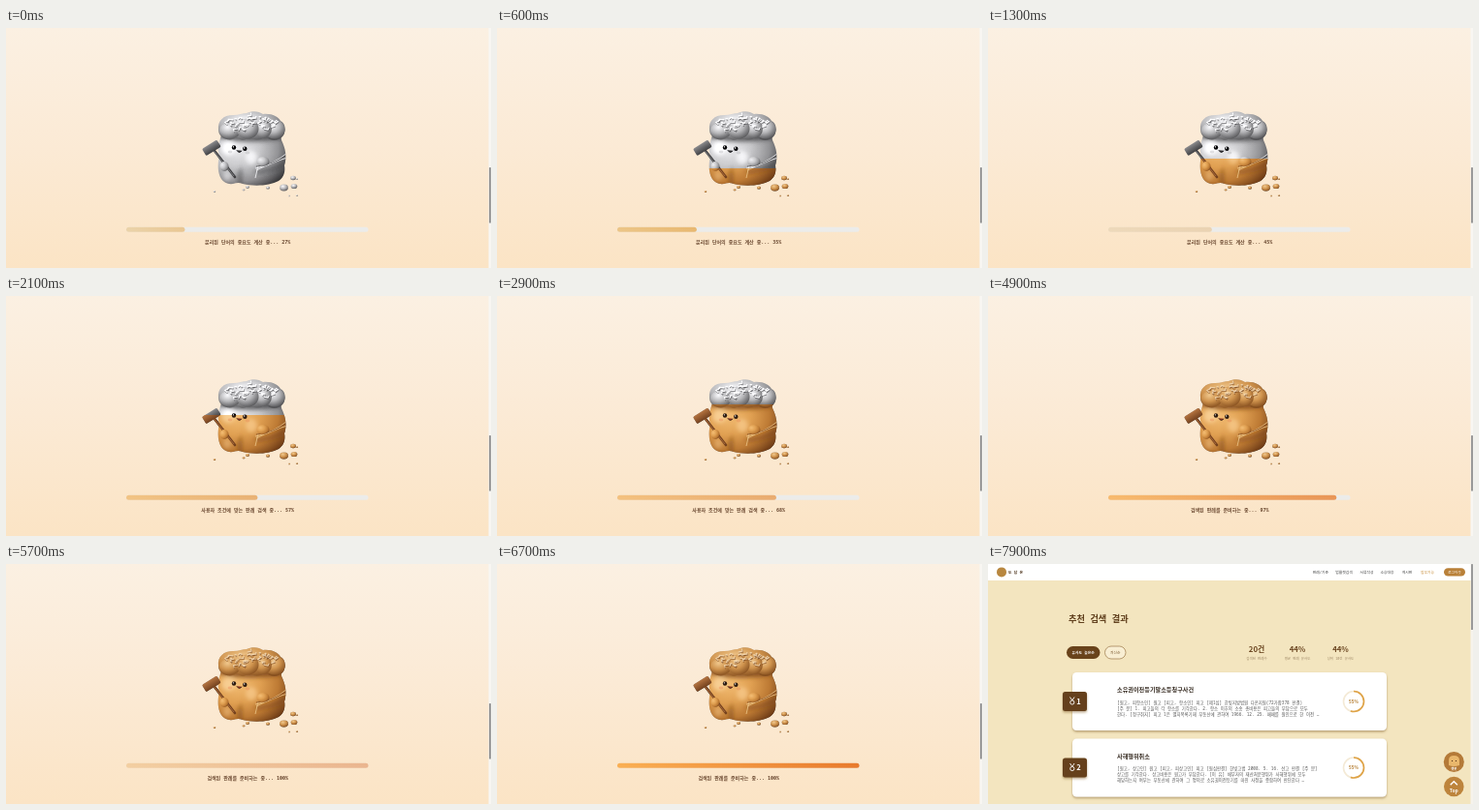
These frames come from a looping animation (500 by 248 pixels, 8000 ms). An HTML page:

```html
<!DOCTYPE html>
<html lang="ko">
<head>
<meta charset="utf-8">
<style>
html, body { margin: 0; width: 100%; height: 100%; overflow: hidden; background: #fbead4; }
svg { display: block; width: 100vw; height: 100vh; }
text { font-family: "Noto Sans Mono", "Noto Sans CJK KR", monospace; white-space: pre; }
.sans { font-family: "Noto Sans CJK KR", "Noto Sans", sans-serif; }
.mid { text-anchor: middle; }
.bold { font-weight: 700; }
</style>
</head>
<body>
<svg viewBox="0 0 500 248" preserveAspectRatio="none">
  <defs>
    <linearGradient id="sky" x2="0" y2="1">
      <stop stop-color="#fbf0e2"/><stop offset=".5" stop-color="#fbead5"/><stop offset="1" stop-color="#fbe4c5"/>
    </linearGradient>
    <linearGradient id="barFill">
      <stop id="barStart"/><stop id="barEnd" offset="1"/>
    </linearGradient>
    <radialGradient id="dough" cx=".28" cy=".32" r=".85">
      <stop stop-color="#f3bd74"/><stop offset=".4" stop-color="#e0a052"/>
      <stop offset=".72" stop-color="#bd7a34"/><stop offset="1" stop-color="#6f3c16"/>
    </radialGradient>
    <radialGradient id="crust" cx=".38" cy=".3" r=".75">
      <stop stop-color="#f0c78c"/><stop offset=".5" stop-color="#d0944e"/><stop offset="1" stop-color="#87501f"/>
    </radialGradient>
    <linearGradient id="wood" x2="0" y2="1">
      <stop stop-color="#b57440"/><stop offset="1" stop-color="#75421f"/>
    </linearGradient>
    <filter id="gray" color-interpolation-filters="sRGB" x="-.1" y="-.1" width="1.2" height="1.2">
      <feColorMatrix type="saturate" values="0"/>
      <feComponentTransfer>
        <feFuncR type="linear" slope="1.45" intercept="-.17"/>
        <feFuncG type="linear" slope="1.45" intercept="-.17"/>
        <feFuncB type="linear" slope="1.45" intercept="-.16"/>
      </feComponentTransfer>
    </filter>
    <filter id="soft" x="-.5" y="-.5" width="2" height="2"><feGaussianBlur stdDeviation="2"/></filter>
    <filter id="shadow" x="-.1" y="-.2" width="1.2" height="1.5">
      <feDropShadow dx="0" dy="1.5" stdDeviation="1.3" flood-color="#7a5520" flood-opacity=".5"/>
    </filter>
    <clipPath id="below"><rect id="belowRect" x="190" width="130" height="120"/></clipPath>
    <clipPath id="inBody"><use href="#body"/></clipPath>
    <g id="bread">
      <path id="body" d="M223 108C220 117 217 124 220 132C218 140 218 150 222 156Q226 162 234 161Q240 159 244 161C256 164 272 163 281 158C287 154 288 148 287 142C290 133 288 124 284 116L282 106Z" fill="url(#dough)"/>
      <g clip-path="url(#inBody)">
        <g filter="url(#soft)">
          <path d="M220 114Q250 121 288 114V108H220Z" fill="#7a4318" opacity=".75"/>
          <path d="M240 164Q236 152 243 143L244 164Z" fill="#7a4318" opacity=".55"/>
          <path d="M256 147Q270 146 290 136V143Q272 151 258 151Z" fill="#7a4318" opacity=".5"/>
          <ellipse cx="229" cy="124" rx="7" ry="7" fill="#ffdfae" opacity=".6"/>
          <ellipse cx="253" cy="134" rx="6" ry="7" fill="#ffd79e" opacity=".55"/>
          <ellipse cx="228" cy="153" rx="4" ry="5" fill="#ffd79e" opacity=".4"/>
        </g>
        <path d="M257 145Q276 141 290 129M258 147Q276 138 290 134M260 142L257 155" fill="none" stroke="#f0c98c" stroke-width=".8"/>
        <path d="M258 143Q276 141 288 132" fill="none" stroke="#7d451a" stroke-width=".7"/>
      </g>
      <path d="M219 105C218 96 224 90 234 90C240 90 244 88 248 88C254 85 261 86 265 89C274 88 281 92 283 96C288 98 289 106 286 111C281 118 272 117 268 112C262 117 255 116 250 113C246 118 240 115 238 113C232 118 219 115 219 105Z" fill="url(#crust)"/>
      <g id="lumps" fill="url(#crust)"/>
      <g id="cracks" fill="none" stroke-linecap="round"/>
      <ellipse cx="265" cy="138" rx="6.5" ry="5" fill="url(#dough)"/>
      <path d="M215 127L236 154" stroke="#75421f" stroke-width="2.6" stroke-linecap="round"/>
      <path d="M214.5 127L235 153" stroke="#b57440" stroke-width=".8"/>
      <rect x="203" y="119.5" width="18" height="8.5" rx="1.5" fill="url(#wood)" transform="rotate(-32 212 124)"/>
      <ellipse cx="225" cy="143" rx="4.5" ry="5" fill="url(#dough)"/>
      <g fill="#2d1b10"><circle cx="235" cy="123.5" r="2.2"/><circle cx="246.3" cy="124.7" r="2.2"/></g>
      <g fill="#fff"><circle cx="234.4" cy="122.8" r=".65"/><circle cx="245.7" cy="124" r=".65"/></g>
      <path d="M237.8 126.3Q240.5 130.3 243 126.8" fill="#8b3020" stroke="#2d1b10" stroke-width=".8"/>
      <g fill="#ec9660" opacity=".5"><ellipse cx="231" cy="128" rx="2.4" ry="1.4"/><ellipse cx="249" cy="129" rx="2.4" ry="1.4"/></g>
      <g id="crumbs" fill="url(#crust)"/>
    </g>
  </defs>

  <g id="loading">
    <rect width="500" height="248" fill="url(#sky)"/>
    <use href="#bread" filter="url(#gray)"/>
    <g id="baked" clip-path="url(#below)"><use href="#bread"/></g>
    <rect x="124" y="205.7" width="249.5" height="5" rx="2.5" fill="#ececea"/>
    <rect id="bar" x="124" y="205.7" height="5" rx="2.5" fill="url(#barFill)"/>
    <text id="status" class="mid bold" x="249.2" y="222.8" font-size="5" fill="#6a4830"/>
    <rect x="497.5" width="2.5" height="248" fill="#f8f6f2"/>
    <rect x="498" y="144" width="2" height="57.5" rx=".5" fill="#999"/>
  </g>

  <g id="results">
    <rect width="500" height="248" fill="#f3e5bf"/>
    <rect width="500" height="17" fill="#fff"/>
    <circle cx="14" cy="8.4" r="5" fill="#b8873f"/>
    <text class="bold" x="21" y="10" font-size="3.8" fill="#4a3018">도 담 온</text>
    <g id="nav" class="mid" font-size="3.8" fill="#444"/>
    <rect x="470" y="4.2" width="22" height="8.4" rx="4.2" fill="#b98038"/>
    <text class="mid" x="481" y="9.7" font-size="3.7" fill="#fff">로그아웃</text>
    <text class="bold" x="83" y="60" font-size="9.2" fill="#5f3e1c">추천 검색 결과</text>
    <rect x="81" y="85" width="34.5" height="13" rx="6.5" fill="#69431b"/>
    <text class="mid bold" x="98.2" y="92.9" font-size="3.8" fill="#fff">유사도 높은순</text>
    <rect x="120.5" y="85" width="21.5" height="13" rx="6.5" fill="#f8eed3" stroke="#9b7848" stroke-width=".7"/>
    <text class="mid" x="131.2" y="92.9" font-size="3.8" fill="#7b5a32">최신순</text>
    <g id="stats"/>
    <g id="cards"/>
    <circle cx="480.3" cy="204.5" r="10.5" fill="#b47a38"/>
    <path d="M475 203Q475 198 480.3 198Q486 198 486 203V208Q480 210 475 208Z" fill="#e9b76c"/>
    <path d="M478.5 203V204M482.5 203V204" stroke="#4a2a12"/>
    <text class="mid bold" x="480.3" y="212.6" font-size="3.3" fill="#fff">챗봇</text>
    <circle cx="480.3" cy="230" r="10.3" fill="#bd843c"/>
    <path d="M476.7 228.3L480.3 224.8L483.9 228.3" fill="none" stroke="#fff" stroke-width="1.4"/>
    <text class="sans mid bold" x="480.3" y="235.8" font-size="5" fill="#fff">Top</text>
    <rect x="497.5" width="2.5" height="248" fill="#f6f3ec"/>
    <rect x="498" width="2" height="68" rx=".5" fill="#999"/>
  </g>
</svg>
<script>
const LOOP = 8000, SWITCH = 7000;
const $ = id => document.getElementById(id);
const clamp = (v, lo = 0, hi = 1) => Math.min(hi, Math.max(lo, v));
const set = (node, attrs) => { for (const k in attrs) node.setAttribute(k, attrs[k]); };
const mix = (a, b, p) => `rgb(${a.map((v, i) => Math.round(v + (b[i] - v) * p))})`;

function buildBread() {
  const lumps = [[231, 106, 11, 8.5], [277, 105, 10.5, 9.5], [265, 104, 9, 10], [249, 104, 11.5, 10.5]];
  $('lumps').innerHTML = lumps.map(([x, y, rx, ry]) =>
    `<ellipse cx="${x}" cy="${y}" rx="${rx}" ry="${ry}"/>`).join('');

  let seed = 11;
  const rand = () => (seed = seed * 16807 % 2147483647) / 2147483647;
  const crack = () => {
    const a = rand() * 2 * Math.PI, r = Math.sqrt(rand());
    const x = 254 + Math.cos(a) * r * 27, y = 98 + Math.sin(a) * r * 8;
    const dx = rand() * 9 - 4.5, dy = rand() * 4 - 2;
    const d = `M${x} ${y}l${dx} ${dy}l${dy} ${-dx / 2}`;
    return `<path d="${d}" transform="translate(.5 1)" stroke="#6d3d18" stroke-width="1.1" opacity=".55"/>` +
      `<path d="${d}" stroke="#f9e3c0" stroke-width="1.1" opacity=".75"/>`;
  };
  $('cracks').innerHTML = Array.from({ length: 44 }, crack).join('');

  const crumbs = [[296, 155, 2.6], [286.5, 165, 4], [297, 163.5, 3], [270, 165, 1.8], [249, 164.5, 1.7],
    [245, 167.3, 1.2], [215, 169, 1.1], [292, 173.5, .8], [300, 173, 1], [300, 156, 1]];
  $('crumbs').innerHTML = crumbs.map(([x, y, r]) =>
    `<ellipse cx="${x}" cy="${y}" rx="${r * 1.1}" ry="${r * .85}"/>`).join('');
}

const cards = [
  { y: 112, title: '소유권이전등기말소등청구사건', lines: [
    '[원고, 피항소인] 원고 [피고, 항소인] 피고 [제1심] 한빛지방법원 다온지원(72가합378 판결)',
    '[주 문] 1. 피고들의 각 항소를 기각한다. 2. 항소 이후의 소송 총비용은 피고들의 부담으로 모두',
    '한다. [청구취지] 피고 1은 별지목록기재 부동산에 관하여 1966. 12. 25. 매매를 원인으로 한 이전 …'] },
  { y: 180.5, title: '사해행위취소', lines: [
    '[원고, 상고인] 원고 [피고, 피상고인] 피고 [원심판결] 한빛고법 2008. 5. 16. 선고 판결 [주 문]',
    '상고를 기각한다. 상고비용은 원고가 부담한다. [이 유] 채무자의 재산처분행위가 사해행위에 모두',
    '해당하는지 여부는 부동산에 관하여 그 명의로 소유권이전등기를 마친 사정을 종합하여 판단한다 …'] }
];

function buildResults() {
  const nav = [['판례/기준', 343], ['법률챗검색', 367], ['서류작성', 390.5], ['소송대응', 411.5], ['게시판', 432], ['업무기능', 453]];
  $('nav').innerHTML = nav.map(([label, x], i) =>
    `<text x="${x}" y="9.8"${i === 5 ? ' fill="#c68a35"' : ''}>${label}</text>`).join('');

  const stats = [['검색된 판례수', 277], ['평균 판례 유사도', 319], ['상위 10건 유사도', 363.5]];
  $('stats').innerHTML = stats.map(([label, x]) =>
    `<text class="stat sans mid bold" x="${x}" y="90.5" font-size="7.8" fill="#6a4520"/>
     <text class="mid" x="${x}" y="99.2" font-size="3.5" fill="#a08a68">${label}</text>`).join('');

  $('cards').innerHTML = cards.map(({ y, title, lines }, i) =>
    `<g transform="translate(0 ${y})">
      <rect x="87" width="324" height="60" rx="4.5" fill="#fff" filter="url(#shadow)"/>
      <rect x="77" y="20" width="25" height="20" rx="2.5" fill="#65411b" filter="url(#shadow)"/>
      <path d="M84.5 25.5L86.8 29L89 25.5" fill="none" stroke="#fff" stroke-width=".9"/>
      <circle cx="86.8" cy="31" r="2.1" fill="none" stroke="#fff" stroke-width=".9"/>
      <text class="sans bold" x="91.2" y="32.8" font-size="7.5" fill="#fff">${i + 1}</text>
      <text class="sans bold" x="133" y="20" font-size="6.15" fill="#33281e">${title}</text>
      ${lines.map((s, n) => `<text x="133" y="${32.5 + 6.2 * n}" font-size="4.4" fill="#555">${s}</text>`).join('')}
      <circle cx="377" cy="30" r="10.5" fill="none" stroke="#f4ead6" stroke-width="1.6"/>
      <circle class="ring" cx="377" cy="30" r="10.5" fill="none" stroke="#dfa347" stroke-width="1.6" pathLength="100" transform="rotate(-90 377 30)"/>
      <text class="score sans mid bold" x="377" y="31.7" font-size="4.6" fill="#b37a2c"/>
    </g>`).join('');
}

function drawLoading(t) {
  const progress = 27 + t * .0143;
  const percent = Math.min(100, Math.floor(progress));
  const message = percent < 55 ? '분리된 단어의 중요도 계산 중...'
    : percent < 80 ? '사용자 조건에 맞는 판례 검색 중...' : '검색된 판례를 준비하는 중...';
  $('status').textContent = `${message} ${percent}%`;

  const warmth = clamp(t / 4200);
  const pulse = .68 + .31 * Math.cos((t - 480) / 1000 * Math.PI);
  set($('bar'), { width: 249.5 * clamp((progress - 2.8) / 100), opacity: pulse });
  set($('barStart'), { 'stop-color': mix([234, 200, 142], [251, 170, 70], warmth) });
  set($('barEnd'), { 'stop-color': mix([232, 182, 108], [232, 112, 28], clamp((t - 800) / 4800)) });

  // The colour rises one pixel per percent.
  set($('belowRect'), { y: 180 - percent });
  set($('baked'), { opacity: clamp(t / 400) });
}

function drawResults(t) {
  const grow = 1 - (1 - clamp((t - SWITCH) / 700)) ** 3;
  const count = n => Math.round(n * grow);
  set($('results'), { opacity: clamp((t - SWITCH) / 200) });
  document.querySelectorAll('.stat').forEach((node, i) => {
    node.textContent = i ? count(44) + '%' : count(20) + '건';
  });
  document.querySelectorAll('.ring').forEach(node => set(node, { 'stroke-dasharray': `${55 * grow} 100` }));
  document.querySelectorAll('.score').forEach(node => { node.textContent = count(55) + '%'; });
}

function frame(now) {
  const t = now % LOOP;
  drawLoading(t);
  drawResults(t);
  requestAnimationFrame(frame);
}

buildBread();
buildResults();
frame(performance.now());
</script>
</body>
</html>
```
